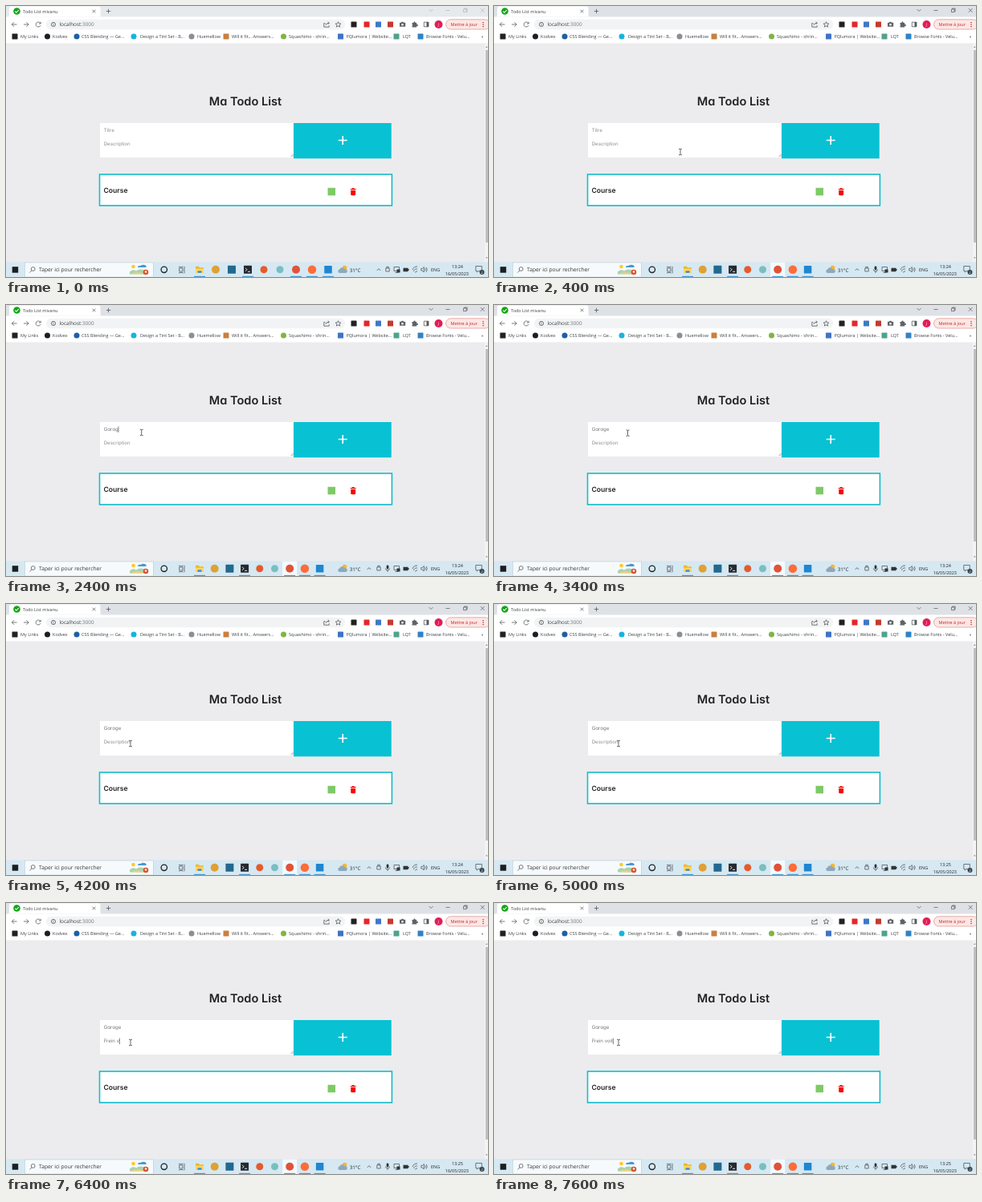
Recreate the animation shown at these times as an HTML page. Size 600x338 px, loop 8000 ms.

```html
<!DOCTYPE html>
<html lang="fr">
<head>
<meta charset="utf-8">
<title>Ma Todo List</title>
<style>
html, body { margin: 0; width: 100%; height: 100%; overflow: hidden; background: #ececee; }
svg { display: block; width: 100vw; height: 100vh; }
text { font: 5.5px "Open Sans", "Noto Sans", sans-serif; fill: #3c4043; text-rendering: geometricPrecision; }
.app text { font: 6.1px Inter, sans-serif; font-feature-settings: "cv11"; fill: #777; }
.app .title { font-size: 14.6px; font-weight: 600; fill: #222; text-anchor: middle; }
.app .task { font-size: 8.6px; font-weight: 600; fill: #222; }
.app .hint { fill: #8d8d8d; }
.line { fill: none; stroke: #55585c; stroke-width: .8; }
.strip { fill: #dee1e6; }
.controls { stroke: #555; stroke-width: .7; }
.idle .strip { fill: #e7eaed; }
.idle .controls { stroke: #b0b3b6; }
.idle .focused { display: none; }
.end { text-anchor: end; }
</style>
</head>
<body>
<svg id="stage" viewBox="0 0 600 338" preserveAspectRatio="none">
  <!-- tab strip -->
  <rect width="600" height="47" fill="#fff"/>
  <rect class="strip" width="600" height="13.5"/>
  <path d="M2 13.5q2 0 2-2V3q0-2.500 2.500-2.500H115q2.500 0 2.500 2.500v8.500q0 2 2 2z" fill="#fff"/>
  <circle cx="13.500" cy="6.500" r="4.300" fill="#12a516"/>
  <path d="M11.300 6.600l1.600 1.700 2.900-3.300" fill="none" stroke="#fff" stroke-width="1.100"/>
  <text x="21" y="8.600">Todo List mivanu</text>
  <path class="line" d="M107.700 4.700l3.600 3.600m0-3.600l-3.600 3.600M124.800 6.500h5.400m-2.700-2.700v5.400"/>
  <path class="line controls" d="M526.500 4l2.500 2.500 2.500-2.500M547.500 5.500h5M569.500 4h3.600v3.600h-3.600zM570.500 4v-1h3.600v3.600h-1M590.800 3l4.800 4.800m0-4.800l-4.800 4.800"/>

  <!-- toolbar -->
  <path class="line" d="M13.500 23H7.300m2.800-2.800L7.300 23l2.800 2.800M22 23h6.200m-2.800-2.800L28.200 23l-2.800 2.800M42.800 21.500a3 3 0 1 0 .2 2.600M43.200 19.800v2.200h-2.300"/>
  <rect x="50" y="16.800" width="372" height="12.400" rx="6.200" fill="#f1f3f4"/>
  <circle class="line" cx="59" cy="23" r="2.600"/>
  <path class="line" d="M59 22.700v1.700M59 21.200v.7"/>
  <text x="66.500" y="25.200" style="font-size:6.400px">localhost<tspan fill="#74787d">:3000</tspan></text>
  <path class="line" d="M397.500 21.500h-1.700v4.700h6.400v-2M397.800 24q.6-2.800 4.400-2.800m-1.500-1.700l1.700 1.700-1.700 1.700"/>
  <path class="line" d="M413.500 19.700l1 2.200 2.400.2-1.800 1.600.5 2.400-2.100-1.200-2.100 1.200.5-2.400-1.800-1.600 2.400-.2z"/>
  <g id="extensions"></g>
  <path d="M491 20.800h1l.6-1h1.800l.6 1h2.200v5H490v-5z" fill="#5f6368"/>
  <circle cx="493.500" cy="23.300" r="1.300" fill="#fff"/>
  <path d="M505.500 21h2a1.100 1.100 0 1 1 2 0h1.700v2a1.100 1.100 0 1 1 0 1.800v1.700h-5.700v-1.600a1.100 1.100 0 0 0 0-2z" fill="#5f6368"/>
  <path class="line" d="M520.300 20.200h5.600v5.600h-5.600z"/>
  <path d="M523.500 20h2.600v6h-2.600z" fill="#55585c"/>
  <circle cx="538.500" cy="23" r="5" fill="#e31c55"/>
  <text x="537.600" y="24.800" style="font-size:5px;fill:#fff">J</text>
  <rect x="547.500" y="16.800" width="55" height="12.200" rx="6.100" fill="#fce8e6" stroke="#e39a94" stroke-width=".8"/>
  <text x="553.500" y="25" style="fill:#c5221f">Mettre à jour</text>
  <path d="M594 20v6.500" stroke="#c5221f" stroke-width="1.300" stroke-dasharray="1.300 1.200"/>

  <g id="bookmarks"></g>
  <text x="591.500" y="40">»</text>

  <!-- page -->
  <rect y="46.500" width="600" height="273" fill="#ececee"/>
  <rect x="596" y="46.500" width="4" height="273" fill="#f3f3f3"/>
  <rect x="597" y="55" width="3" height="240" fill="#bfbfc1"/>
  <path d="M597 51.800l1.300-1.600 1.300 1.600zM597 313.500l1.300 1.600 1.300-1.600z" fill="#777"/>
  <g class="app">
    <text class="title" x="298" y="123.600">Ma Todo List</text>
    <rect x="117" y="146" width="242" height="43" fill="#fff"/>
    <path d="M354.500 188l3.300-3.300m-1.500 3.300l1.500-1.500" stroke="#777" stroke-width=".6"/>
    <rect x="358" y="146" width="121.700" height="44.200" fill="#08c1d3"/>
    <path d="M413.700 167.500h11m-5.500-5.500v11" stroke="#fff" stroke-width="1.600"/>
    <rect x="116.500" y="210" width="363.900" height="38.900" fill="#fff" stroke="#13bccb" stroke-width="1.600"/>
    <text class="task" x="121.500" y="232.500">Course</text>
    <rect x="400.500" y="226.800" width="9.500" height="9.500" fill="#7ec968"/>
    <path d="M428.700 228h1.800l.6-.9h2.100l.6.9h1.800v1.100h-6.900zM429.200 229.700h5.900v5.400q0 1.100-1.100 1.100h-3.700q-1.100 0-1.100-1.100z" fill="#f30808"/>
    <text id="name" x="121.700" y="157.200"></text>
    <text id="details" x="121.700" y="174.400"></text>
    <path id="caret" d="M0-5.800v7.600" stroke="#333" stroke-width=".6"/>
  </g>

  <!-- taskbar -->
  <rect y="319.500" width="600" height="18.500" fill="#d6e8f2"/>
  <rect x="7.700" y="325.200" width="7.500" height="7.500" fill="#1b1f22"/>
  <rect x="23.300" y="320" width="160" height="18" fill="#f6fafc" stroke="#bccbd2" stroke-width=".6"/>
  <circle class="line" cx="33.700" cy="328" r="2.400"/>
  <path class="line" d="M32 329.800l-2.600 2.700"/>
  <text x="41" y="331.400" style="font-size:6.700px;fill:#333">Taper ici pour rechercher</text>
  <path d="M154 334.500v-3q4-4 8-1 5-4 12 0v4z" fill="#a9d3ae"/>
  <circle cx="158.500" cy="325" r="2.300" fill="#ffc928"/>
  <path d="M164 325.500q1-2.500 3.500-1.500 3-2.500 7 0v2h-10.500z" fill="#4b97d3"/>
  <path d="M155 334.500q8-4 16-1v1z" fill="#f1cf7b"/>
  <circle cx="174" cy="332" r="3.300" fill="#d9562f"/>
  <circle cx="174" cy="331.500" r="1.200" fill="#fff"/>
  <circle class="line" cx="196.800" cy="328.800" r="3.700" style="stroke:#222;stroke-width:1.300"/>
  <path class="line" d="M215.700 327h4.200v4h-4.200zM215.700 324.700v1h4.200v-1M215.700 333.500v-1h4.200v1M222 324.800v8.500"/>
  <g id="apps"></g>
  <circle cx="421.500" cy="326.500" r="2.800" fill="#f8b52c"/>
  <path d="M415 333a2.300 2.300 0 0 1 .2-4.500 3.500 3.500 0 0 1 6.300-.3 2.500 2.500 0 0 1 1.500 4.800z" fill="#8ea9bd"/>
  <text x="427.700" y="331.500" style="font-size:6.200px;fill:#222">31°C</text>
  <path id="chevron" class="line" d="M-2.300 1.200L0-1.200l2.300 2.400"/>
  <path id="device" class="line" d="M-2.200-1.800h4.400v4h-4.400zM-1.200-1.800v-1.700h2.400v1.700"/>
  <g class="focused">
    <rect x="473.600" y="324.500" width="2.800" height="5" rx="1.400" fill="#333"/>
    <path class="line" d="M472.400 328.500q0 2.500 2.600 2.500t2.600-2.500M475 331v2"/>
  </g>
  <path class="line" d="M483 325.500h6.500v5H483zM484.500 332.500h3.500"/>
  <rect x="486.500" y="328.500" width="4" height="4" fill="#333"/>
  <path d="M494.500 326.700h6v1.300h1v2h-1v1.300h-6z" fill="#333"/>
  <path class="line" d="M506 329a6 6 0 0 1 6-4M507.500 331a4 4 0 0 1 4.500-3M509.500 332.500a2 2 0 0 1 2.500-1.500M516.800 327.500h1.400l2-2v6.500l-2-2h-1.400zM521.700 327.300q1.200 1.500 0 3M523.200 326q2 2.800 0 5.600"/>
  <text x="529" y="331" style="fill:#222">ENG</text>
  <text id="clock" class="end" x="569" y="327" style="fill:#222"></text>
  <text class="end" x="576" y="335.700" style="fill:#222">16/05/2023</text>
  <path class="line" d="M584.800 324.500h7.500v6h-4.500l-1.500 1.700v-1.700h-1.500z"/>
  <circle cx="592.500" cy="332" r="3" fill="#35424a"/>
  <text x="591.200" y="333.700" style="font-size:4.500px;fill:#fff">2</text>

  <path id="beam" d="M-2-3.800q2 0 2 .8v6q0 .8-2 .8M2-3.800q-2 0-2 .8M2 3.800q-2 0-2-.8" fill="none" stroke="#222" stroke-width=".7"/>
</svg>
<script>
const $ = id => document.getElementById(id);
const LOOP = 8000, STEP = 200;

const square = (x, y, size, color) =>
  `<rect x="${x - size / 2}" y="${y - size / 2}" width="${size}" height="${size}" rx=".6" fill="${color}"/>`;
const disc = (x, y, size, color) =>
  `<circle cx="${x}" cy="${y}" r="${size / 2}" fill="${color}"/>`;

$('extensions').innerHTML = [
  [433, '#222'], [449, '#e5252a'], [463.5, '#3d79c9'], [478.5, '#c43b2f']
].map(([x, color]) => square(x, 23, 7, color)).join('');

const bookmarks = [
  [11, 18, square, '#222', 'My Links'],
  [51.5, 58, disc, '#1b1f23', 'Kodvex'],
  [88, 94, disc, '#1d5fa8', 'CSS Blending — Ge...'],
  [159, 167, disc, '#16b4e0', 'Design a Tint Set - B...'],
  [231, 238, disc, '#8a8f94', 'Huemellow'],
  [274, 281, square, '#c9803f', 'Will it fit... Answers...'],
  [345.5, 352, disc, '#82b541', 'Squashimo - shrin...'],
  [416.5, 423.5, square, '#3f74c4', 'PQlumora | Website...'],
  [486, 494, square, '#4fa38c', 'LQT'],
  [516, 523, square, '#2f83c8', 'Browse Fonts - Velu...']
];
$('bookmarks').innerHTML = bookmarks.map(([iconX, textX, shape, color, label]) =>
  shape(iconX, 38, 7, color) + `<text x="${textX}" y="40">${label}</text>`).join('');

const folder = '<path d="M-5-4h4l1 1.500h5V4H-5z" fill="#f2b632"/><path d="M-5-1H5v5H-5z" fill="#ffd766"/><path d="M-2.500 1.500h5V4h-5z" fill="#3b8fd0"/>';
const terminal = square(0, 0, 10, '#25292d') + '<path d="M-3-2l2 2-2 2M0 2.500h3" fill="none" stroke="#fff" stroke-width=".9"/>';
const apps = [
  folder,
  disc(0, 0, 10, '#e0a133'),
  square(0, 0, 10, '#23688f'),
  terminal,
  disc(0, 0, 9, '#e65a2c'),
  disc(0, 0, 9, '#79bfc0'),
  disc(0, 0, 10, '#e0533a'),
  disc(0, 0, 10.5, '#ff6c37'),
  square(0, 0, 9.5, '#1f86d0')
];
const running = [0, 3, 6, 7, 8];
$('apps').innerHTML = apps.map((icon, i) => '<g>' +
  (i === 6 ? '<rect class="focused" x="-9" y="-9" width="18" height="18" fill="#f3fafd"/>' : '') + icon +
  (running.includes(i) ? '<path d="M-7 8.600H7" stroke="#2482c4" stroke-width=".9"/>' : '') + '</g>').join('');

// [time, typed text]
const nameKeys = [..."Garage"].map((_, i, all) => [1600 + STEP * i, all.slice(0, i + 1).join('')]);
const detailKeys = [[5800, 'F'], [6000, 'Fre'], [6200, 'Frein'], [6400, 'Frein v'],
  [6600, 'Frein vo'], [7000, 'Frein voi'], [7600, 'Frein voit']];
// [time, x, y]
const path = [[400, 232, 182], [600, 196, 170], [800, 174, 161], [1000, 168.7, 159], [2600, 168.7, 159],
  [3400, 166.5, 159.7], [4200, 155, 174], [LOOP, 155, 174]];

const lastKey = (keys, t) => keys.filter(([at]) => at <= t).pop();

function pointer(t) {
  const next = Math.max(1, path.findIndex(([at]) => at > t));
  const [t0, x0, y0] = path[next - 1], [t1, x1, y1] = path[next];
  const k = (t - t0) / (t1 - t0);
  return [x0 + (x1 - x0) * k, y0 + (y1 - y0) * k];
}

function fill(field, key, hint) {
  field.textContent = key ? key[1] : hint;
  field.classList.toggle('hint', !key);
}

const move = (node, x, y) => node.setAttribute('transform', `translate(${x} ${y})`);

function render(t) {
  const idle = t < STEP;
  $('stage').classList.toggle('idle', idle);
  [...$('apps').children].forEach((app, i) => move(app, 241 + i * (idle ? 20 : 18.7), 328.8));
  move($('chevron'), idle ? 464 : 452, 328.8);
  move($('device'), idle ? 475 : 464, 328.8);
  $('clock').textContent = t < 4600 ? '13:24' : '13:25';

  const nameKey = lastKey(nameKeys, t), detailKey = lastKey(detailKeys, t);
  fill($('name'), nameKey, 'Titre');
  fill($('details'), detailKey, 'Description');

  const key = detailKey || (t < 4600 && nameKey);
  const caretOn = key && (t - key[0]) % 1000 < 500;
  $('caret').style.display = caretOn ? '' : 'none';
  if (caretOn) {
    const field = detailKey ? $('details') : $('name');
    move($('caret'), 122 + field.getComputedTextLength(), detailKey ? 174.4 : 157.2);
  }

  $('beam').style.display = t < path[0][0] ? 'none' : '';
  move($('beam'), ...pointer(t));
}

const start = performance.now();
let shown = -1;
function tick() {
  const t = Math.floor((performance.now() - start) % LOOP / STEP) * STEP;
  if (t !== shown) render(shown = t);
  requestAnimationFrame(tick);
}
tick();
</script>
</body>
</html>
```
